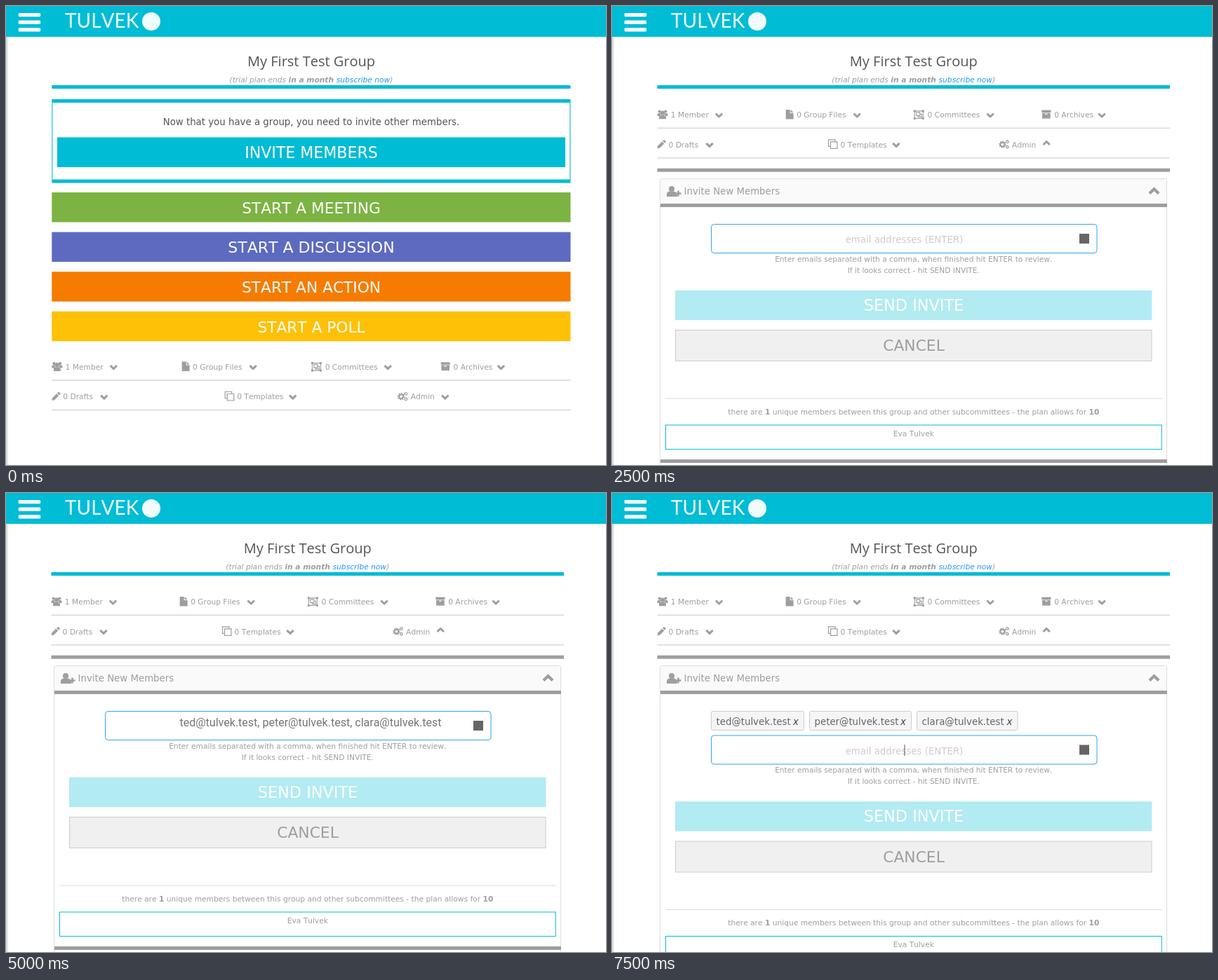
An HTML page for the animation above (8000 ms loop, 855 px wide and 655 px high).

```html
<!DOCTYPE html>
<html lang="en">
<head>
<meta charset="utf-8">
<title>Invite members</title>
<style>
  html, body { margin: 0; width: 100%; height: 100%; overflow: hidden; background: #fff; }
  svg { display: block; }
  text { font-family: "DejaVu Sans", sans-serif; font-kerning: none; white-space: pre; }
  .title { font-family: "Open Sans", sans-serif; }
  .typed { font-family: Roboto, sans-serif; }
  .brand { font-family: Lato, sans-serif; }
</style>
</head>
<body>
<svg id="stage" width="855" height="655" viewBox="0 0 855 655"></svg>
<script>
const CYAN = '#00bcd4', GRAY = '#9e9e9e', RULE = '#dddddd', DARK = '#555555', BLUE = '#2196f3';
const SMALL = 10.67, BODY = 13.33;

const rect = (x, y, w, h, fill, extra = '') =>
  `<rect x="${x}" y="${y}" width="${w}" height="${h}" fill="${fill}" ${extra}/>`;
const box = (x, y, w, h, fill, stroke, r = 0) =>
  rect(x, y, w, h, fill, `stroke="${stroke}" rx="${r}"`);
const text = (x, y, size, fill, str, extra = '') =>
  `<text x="${x}" y="${y}" font-size="${size}" fill="${fill}" ${extra}>${str}</text>`;
const mid = (x, y, size, fill, str, extra = '') =>
  text(x, y, size, fill, str, 'text-anchor="middle" ' + extra);
const group = (x, y, body, extra = '') =>
  `<g transform="translate(${x} ${y})" ${extra}>${body}</g>`;
const bold = s => `<tspan font-weight="bold">${s}</tspan>`;
const chevron = (x, y, up, k = 1) =>
  `<path d="M${x - 4.7 * k} ${y + (up ? 2.2 : -2.2) * k}l${4.7 * k} ${(up ? -4.5 : 4.5) * k}l${4.7 * k} ${(up ? 4.5 : -4.5) * k}"
    fill="none" stroke="${GRAY}" stroke-width="${3 * k}"/>`;

const cog = (x, y, r) =>
  `<circle cx="${x}" cy="${y}" r="${r}" fill="none" stroke="${GRAY}" stroke-width="${r * .7}"/>
   <circle cx="${x}" cy="${y}" r="${r * 1.5}" fill="none" stroke="${GRAY}" stroke-width="${r * .5}"
     pathLength="16" stroke-dasharray="1"/>`;

// Icons start at x = 0 and are centred on y = 0.
const icons = {
  users: `<path d="M0 2v-2q0-2 2-2h3l-1 4zM15 2v-2q0-2-2-2h-3l1 4zM2.5 6.3v-2q0-3.5 3-3.7h4q3 .2 3 3.7v2z" fill="${GRAY}"/>
    <circle cx="3.2" cy="-4.4" r="2.1" fill="${GRAY}"/><circle cx="11.8" cy="-4.4" r="2.1" fill="${GRAY}"/>
    <circle cx="7.5" cy="-2.4" r="3.1" fill="${GRAY}"/>`,
  file: `<path d="M.5-7h6v5h5v8.5h-11zM7.5-7l4 4h-4z" fill="${GRAY}"/>`,
  objects: `<g fill="none" stroke="${GRAY}" stroke-width="1.1"><path d="M1.5-5h12v10.500h-12zM4-3h5v4.500h-5zM9-.5h2.500v4h-5v-2"/></g>`
    + [[0, -6.5], [12, -6.5], [0, 4], [12, 4]].map(([x, y]) => rect(x, y, 3, 3, GRAY)).join(''),
  archive: rect(0, -6.3, 13, 3.4, GRAY) + rect(.7, -2.3, 11.6, 8, GRAY) + rect(4.7, -1.2, 3.6, 1.2, '#fff'),
  pencil: `<path d="M0 6l.8-3.800 6-6 3 3-6 6zM7.600-4.600l1.500-1.400q.6-.5 1.200 0l1.700 1.700q.5.6 0 1.200l-1.400 1.500z" fill="${GRAY}"/>`,
  clone: `<path d="M3.500-3.500h9.500v9.500h-9.500zM3.500 3h-3v-9.500h9.500v3" fill="none" stroke="${GRAY}" stroke-width="1.2"/>`,
  cogs: cog(4.9, .3, 3) + cog(11.8, -3.6, 1.6) + cog(11.8, 3.9, 1.6)
};

// Icon, label, label offset, chevron offset
const menu = [
  [['users', '1 Member', 19.3, 88], ['file', '0 Group Files', 16, 102],
   ['objects', '0 Committees', 19.8, 109.3], ['archive', '0 Archives', 17.8, 85.7]],
  [['pencil', '0 Drafts', 16, 74.5], ['clone', '0 Templates', 17.5, 97], ['cogs', 'Admin', 18.6, 67.7]]
];

const heading = (x, w, cx) =>
  mid(cx, 85.5, 20, DARK, 'My First Test Group', 'class="title"') +
  mid(cx, 108.5, SMALL, GRAY,
    `(trial plan ends ${bold('in a month ')}<tspan fill="${BLUE}">subscribe now</tspan>)`, 'font-style="italic"') +
  rect(x, 113, w, 5, CYAN);

const menuRows = (x, y, w, open) => menu.map((row, r) =>
  row.map(([icon, label, dx, chev], i) => group(x + i * w / row.length, y + r * 42.4,
    icons[icon] + text(dx, 4.3, SMALL, GRAY, label) +
    chevron(chev, open && icon === 'cogs' ? -1.5 : .8, open && icon === 'cogs'))).join('') +
  rect(x, y + 18.5 + r * 42.4, w, 1.8, RULE)).join('');

const button = (y, fill, size, label, x = 65.3, w = 739.2) =>
  rect(x, y, w, 42.5, fill) + mid(435, y + 29.7, size, '#fff', label);

const home = heading(65.3, 739.2, 435) +
  rect(65.3, 133, 739.2, 119.5, CYAN) + rect(66.4, 138, 737, 109.5, '#fff') +
  mid(435, 170, BODY, DARK, 'Now that you have a group, you need to invite other members.') +
  button(187.4, CYAN, 22.1, 'INVITE MEMBERS', 73, 724) +
  button(266, '#7cb342', 21.7, 'START A MEETING') +
  button(322.6, '#5c6bc0', 22, 'START A DISCUSSION') +
  button(379.2, '#f57c00', 21.7, 'START AN ACTION') +
  button(435.8, '#ffc107', 21.7, 'START A POLL') +
  menuRows(65.3, 514.6, 739.2, false);

const userPlus = `<circle cx="7" cy="-3.500" r="4" fill="${GRAY}"/>
  <path d="M0 7.500v-3q0-4 4-4.500h6q2 .3 3 1.500v2.500h2v3.500z" fill="${GRAY}"/>
  <path d="M12.500 3h8M16.500-1v8" stroke="${GRAY}" stroke-width="2.4"/>`;

const panel = heading(64.5, 730.5, 429.8) + menuRows(64.5, 154.9, 730.5, true) +
  rect(64.5, 231.7, 730.5, 5, GRAY) +
  box(68.5, 246.5, 722, 440, '#fff', RULE, 2) +
  rect(69, 247, 721, 35, '#fafafa') + rect(69, 282, 722, 5, GRAY) +
  group(78, 264.5, userPlus) + text(102.5, 269, BODY, GRAY, 'Invite New Members') +
  chevron(772.5, 264.5, true, 1.4);

const form = box(141.5, 311.5, 549.5, 41, '#fff', '#2ba6f0', 4) +
  rect(666, 325, 14, 14, '#666') +
  mid(429.8, 364.800, 10.63, GRAY, 'Enter emails separated with a comma, when finished hit ENTER to review.') +
  mid(429.8, 380.8, 10.63, GRAY, 'If it looks correct - hit SEND INVITE.') +
  rect(90, 405.7, 679.4, 42.5, '#b2ebf2') + mid(430, 434.6, 22.4, '#fff', 'SEND INVITE') +
  box(90.5, 462.5, 678.500, 44, '#f0f0f0', '#cccccc') + mid(430, 492.4, 21.8, GRAY, 'CANCEL') +
  rect(76, 559.6, 708, 1, RULE) +
  mid(429.8, 582.6, SMALL, GRAY,
    `there are ${bold('1')} unique members between this group and other subcommittees - the plan allows for ${bold('10')}`) +
  box(76.5, 598, 706.7, 34.6, '#fff', CYAN) +
  mid(429.8, 613.5, SMALL, GRAY, 'Eva Tulvek') +
  rect(69, 647, 722, 5, GRAY);

const hint = mid(416.5, 338, BODY, '#cccccc', 'email addresses (ENTER)');
const mails = ['ted', 'peter', 'clara'].map(n => n + '@tulvek.test');
const typed = text(247.5, 333.4, 16, '#757575', mails.join(', '), 'class="typed"');

const chips = [[141.5, 132], [281.5, 145], [434.5, 143.5]].map(([x, w], i) =>
  box(x, 311.500, w, 27, '#f5f5f5', '#cccccc', 2) +
  text(x + 7, 330.6, BODY, '#666', mails[i]) +
  text(x + w - 15.5, 330.6, BODY, '#444', 'x', 'font-style="italic"')).join('');
const caret = rect(416.5, 324.5, 1, 16, DARK);

const header = rect(0, 0, 855, 44, CYAN) +
  [10, 20.6, 31.2].map(y => rect(17.7, y, 31.5, 5.2, '#fff', 'rx="1.5"')).join('') +
  text(84, 31, 28, '#f0fcfd', 'TULVEK', 'class="brand"') +
  '<circle cx="207" cy="22" r="13" fill="#f0fcfd"/>';
const edge = `<linearGradient id="edge"><stop stop-color="#cfcfcf"/><stop offset="1" stop-color="#fff"/></linearGradient>` +
  rect(0, 44, 4, 611, 'url(#edge)');

const ring = (cx, cy, rx, ry) =>
  `<ellipse cx="${cx}" cy="${cy}" rx="${rx}" ry="${ry}" fill="none" stroke="#f20d0d" stroke-width="3.5"/>`;

const layers = {
  home,
  panel,
  form: form,
  hint,
  typed,
  chips: chips + group(0, 34.5, form + hint + caret),
  ringInvite: ring(433.8, 210.6, 118.5, 24.2),
  ringHint: ring(426, 331.7, 118.500, 24.2),
  ringTyped: ring(433.5, 329, 220.8, 22.4)
};

// Start time in ms and the layers shown from then on
const steps = [
  [0, 'home'],
  [500, 'home ringInvite'],
  [2500, 'panel form hint'],
  [3000, 'panel form hint ringHint'],
  [5000, 'panel form typed'],
  [5500, 'panel form typed ringTyped'],
  [7500, 'panel chips']
].map(([at, names]) => [at, names.split(' ')]);
const LOOP = 8000;

const stage = document.getElementById('stage');
stage.innerHTML = edge + header +
  Object.entries(layers).map(([id, body]) => `<g id="${id}" display="none">${body}</g>`).join('');
const nodes = Object.keys(layers).map(id => [id, document.getElementById(id)]);

const start = performance.now();
let shown = null;
function draw() {
  const t = (performance.now() - start) % LOOP;
  const step = steps.filter(([at]) => at <= t).pop();
  if (step !== shown) {
    shown = step;
    for (const [id, node] of nodes)
      node.setAttribute('display', step[1].includes(id) ? 'inline' : 'none');
  }
  requestAnimationFrame(draw);
}
draw();
</script>
</body>
</html>
```
